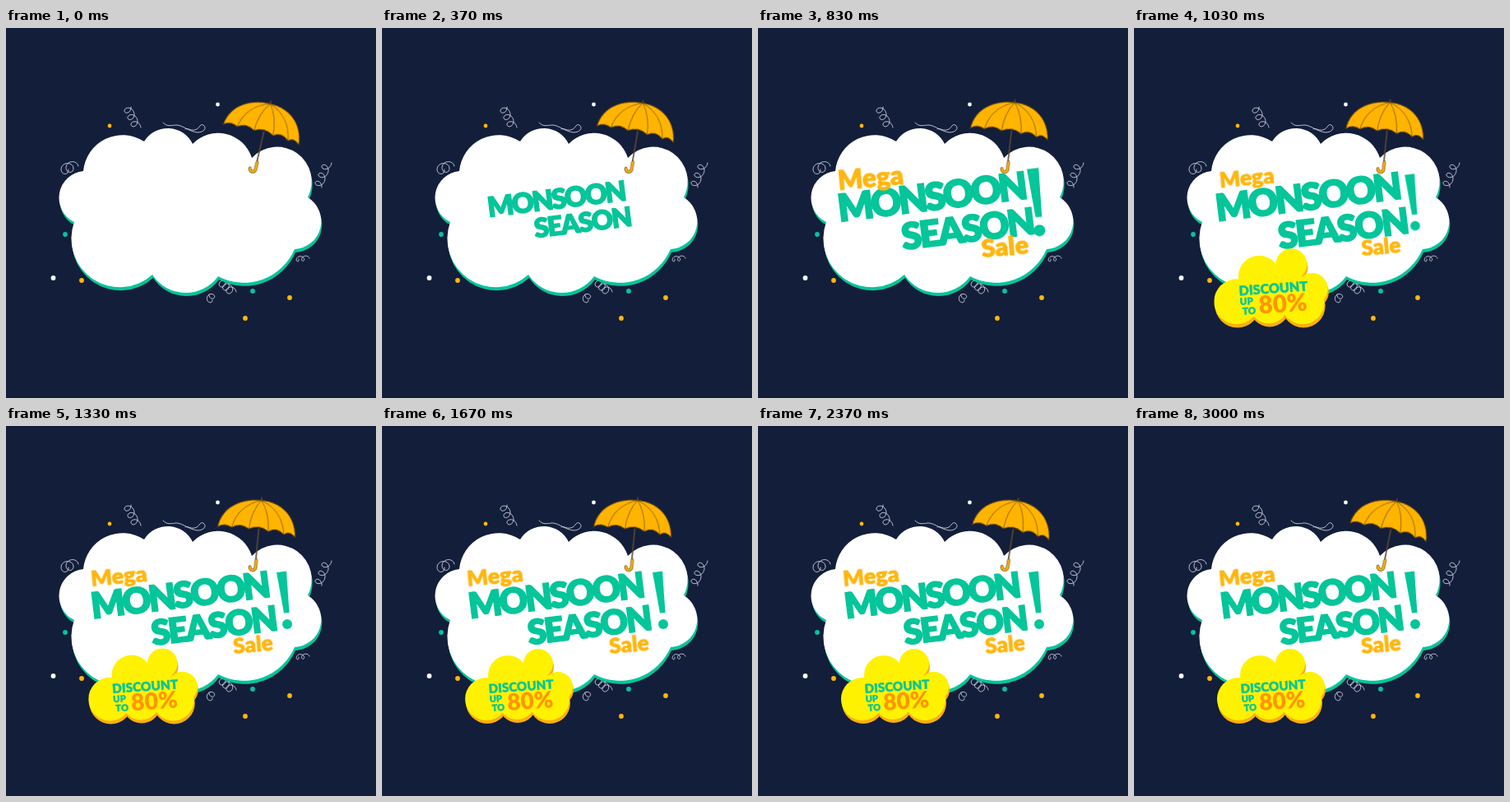
Recreate the animation shown at these times as an HTML page. Size 450 by 450 pixels, loop 3030 ms.

```html
<!DOCTYPE html>
<html lang="en">
<head>
<meta charset="utf-8">
<title>Monsoon sale</title>
<style>
  html, body { margin: 0; width: 100%; height: 100%; overflow: hidden; background: #131e3a; }
  svg { display: block; width: 100vw; height: 100vh; }
  text { font-family: Lato, "Open Sans", sans-serif; font-weight: 900; }
  .teal { fill: #05c59a; stroke: #05c59a; }
  .gold { fill: #ffb60f; stroke: #ffb60f; }
  .white { fill: #fff; stroke: #fff; }
  .flat { stroke: none; }
  .thick { stroke-width: 1.8; }
  .firm { stroke-width: .7; }
  .curls { fill: none; stroke: #dfe3ec; stroke-width: .8; stroke-linecap: round; }
</style>
</head>
<body>
<svg viewBox="0 0 450 450">
  <defs>
    <path id="cloud" d="M83 236A32.7 32.7 0 0 1 94 174A48 48 0 0 1 168 138A33.6 33.6 0 0 1 227 141A43 43 0 0 1 299 158A42 42 0 0 1 367 206A34 34 0 0 1 351 269A67 67 0 0 1 258 302A48.5 48.5 0 0 1 178 300A59 59 0 0 1 83 236Z"/>
    <g id="puff">
      <circle cx="127" cy="332" r="26"/>
      <circle cx="153" cy="303" r="24"/>
      <circle cx="190" cy="289" r="18"/>
      <circle cx="214" cy="317" r="18"/>
      <circle cx="203" cy="333" r="25"/>
      <circle cx="164" cy="334" r="23"/>
      <circle cx="185" cy="310" r="18"/>
    </g>
  </defs>

  <rect width="450" height="450" fill="#131e3a"/>

  <g class="curls">
    <path id="coils"/>
    <path d="M191 115C196 121 202 118 208 118C216 119 223 126 233 127C240 127 245 122 240 118C235 116 236 123 229 124C224 125 221 121 218 123"/>
  </g>

  <g id="dots"></g>

  <use href="#cloud" class="teal flat" x="1" y="4"/>
  <use href="#cloud" class="white flat"/>

  <g transform="translate(303 172)">
    <g id="umbrella" stroke="#6b4408" stroke-linecap="round" stroke-linejoin="round" fill="none">
      <path d="M0-47V-3M0-82V-85" stroke="#5b4630" stroke-width="1.6"/>
      <path d="M.5-9V0a3.5 3.5 0 0 1-7 0" stroke-width="3.800"/>
      <path d="M.5-9V0a3.5 3.5 0 0 1-7 0" stroke="#ffb60f" stroke-width="2.400"/>
      <path d="M-50-45C-47-70-24-82 0-82C24-82 43-67 45-41Q37-49 31-43Q21-52 12-45Q0-53-12-46Q-23-53-33-46Q-43-51-50-45Z" fill="#ffb400" stroke-width=".9"/>
      <path d="M0-82Q-28-73-33-46M0-82Q-11-68-12-46M0-82Q11-68 12-45M0-82Q27-72 31-43" stroke-width=".7"/>
    </g>
  </g>

  <g id="title" class="teal thick">
    <text transform="translate(107 234) rotate(-7)" font-size="42.500" letter-spacing="-3">MONSOON</text>
    <text transform="translate(179 266) rotate(-7)" font-size="41" letter-spacing="-2.200">SEASON</text>
  </g>
  <g id="bang" class="teal flat">
    <path d="M329 178L341 176.500L344.500 227L338 227.500Z"/>
    <circle cx="342" cy="241" r="6"/>
  </g>
  <g id="mega" class="gold firm">
    <text transform="translate(104 195) rotate(-5)" font-size="27">Mega</text>
  </g>
  <g id="sale" class="gold firm">
    <text transform="translate(277 277) rotate(-5)" font-size="26">Sale</text>
  </g>

  <g id="offer">
    <use href="#puff" x="1" y="4" fill="#fbae12"/>
    <use href="#puff" fill="#fff200"/>
    <g class="teal" stroke-width=".4">
      <text transform="translate(130 325) rotate(-4)" font-size="15.200">DISCOUNT</text>
      <text transform="translate(131 336) rotate(-4)" font-size="11">UP</text>
      <text transform="translate(134 347) rotate(-4)" font-size="11">TO</text>
    </g>
    <text transform="translate(153 346) rotate(-4)" font-size="28" fill="#ff9500">80%</text>
  </g>
</svg>
<script>
  const LOOP = 3030;
  const $ = id => document.getElementById(id);

  // a looping curl wound around the line from (x0, y0) to (x1, y1)
  function coil(x0, y0, x1, y1, turns, r) {
    const n = turns * 16;
    const points = Array.from({ length: n + 1 }, (_, i) => {
      const k = i / n, a = k * turns * 2 * Math.PI;
      return [x0 + (x1 - x0) * k + r * Math.cos(a), y0 + (y1 - y0) * k + r * Math.sin(a)];
    });
    return 'M' + points.map(p => p.map(v => v.toFixed(1)).join(' ')).join('L');
  }
  $('coils').setAttribute('d',
    coil(70, 172, 82, 168, 2, 6) + coil(147, 96, 159, 121, 3, 5) + coil(391, 164, 379, 194, 3, 5) +
    coil(353, 281, 366, 280, 2, 3) + coil(262, 309, 275, 321, 3, 5) + coil(247, 331, 251, 324, 1.5, 4));

  const dot = (tone, x, y, r = 2.9) =>
    `<circle class="${tone} flat" cx="${x}" cy="${y}" r="${r}"/>`;
  $('dots').innerHTML =
    dot('gold', 126, 119, 2.4) + dot('gold', 92, 307) + dot('gold', 345, 328) + dot('gold', 291, 353) +
    dot('white', 257.5, 93, 2.4) + dot('white', 57.5, 304) +
    dot('teal', 72, 251) + dot('teal', 300, 320);

  const loop = (id, frames) => $(id).animate(frames, { duration: LOOP, iterations: Infinity });

  // damped swing from 0 to 1, s in seconds
  const spring = s => s <= 0 ? 0 : 1 - Math.exp(-5.2 * s) * Math.cos(9.5 * s);

  function pop(id, x, y, start) {
    $(id).style.transformOrigin = `${x}px ${y}px`;
    const steps = 100;
    loop(id, Array.from({ length: steps + 1 }, (_, i) =>
      ({ transform: `scale(${spring((i / steps * LOOP - start) / 1000)})` })));
  }

  pop('mega', 139, 184, 495);
  pop('bang', 340, 212, 505);
  pop('sale', 301, 265, 515);
  pop('offer', 166, 318, 850);

  // the headline overshoots, then settles slowly
  $('title').style.transformOrigin = '214px 215px';
  loop('title', [
    { transform: 'scale(0)' },
    { transform: 'scale(0)', offset: 150 / LOOP, easing: 'ease-out' },
    { transform: 'scale(1.085)', offset: 560 / LOOP, easing: 'ease-in-out' },
    { transform: 'scale(1)', offset: 1670 / LOOP },
    { transform: 'scale(1)' }
  ]);

  loop('umbrella', [
    { transform: 'rotate(13deg)', easing: 'ease' },
    { transform: 'rotate(5.3deg)', offset: 0.495, easing: 'ease-in-out' },
    { transform: 'rotate(11.5deg)' }
  ]);
</script>
</body>
</html>
```
